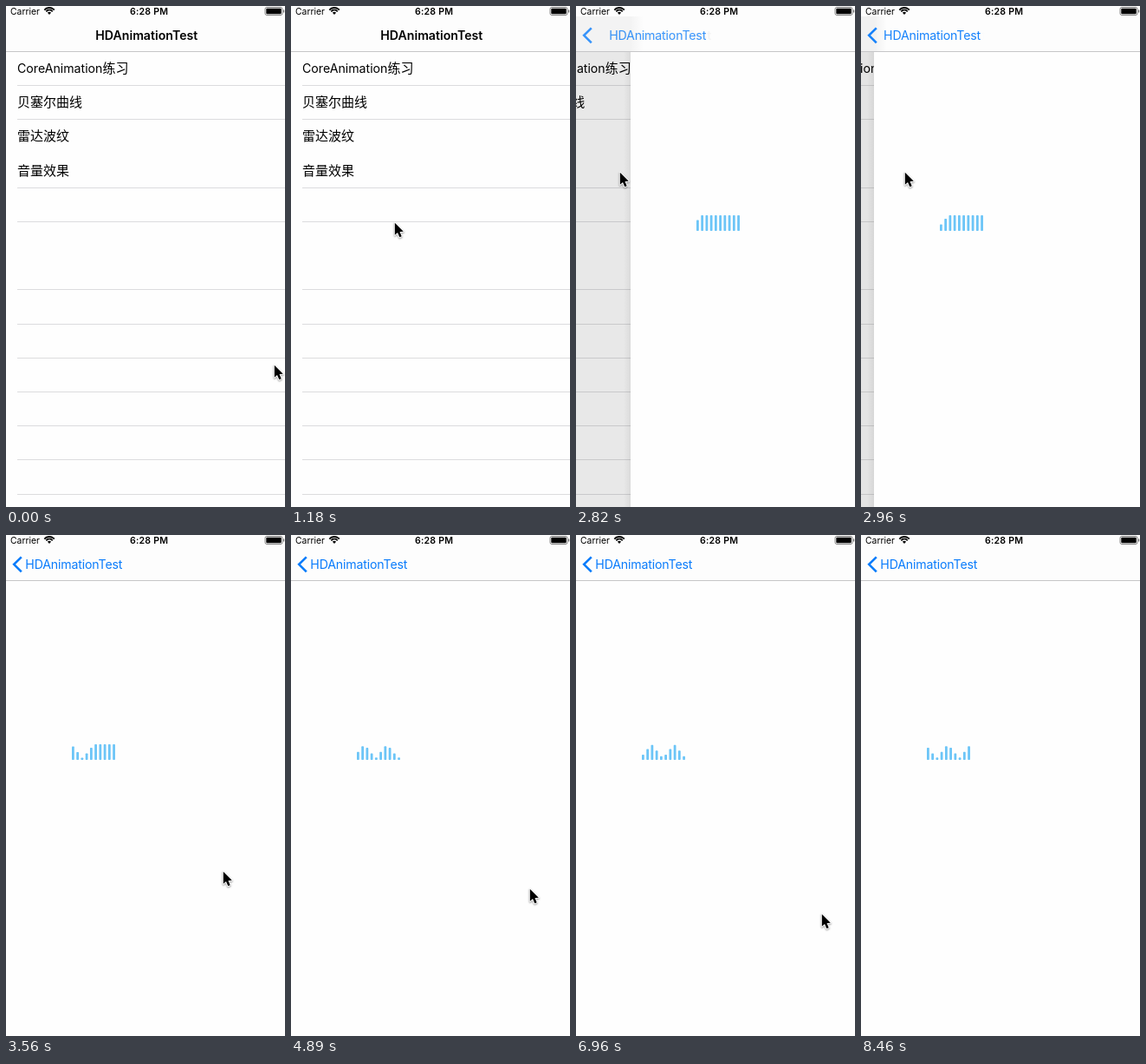
Animation, 322 px wide and 577 px high, one loop 8560 ms. Source, as an HTML page with a canvas:

```html
<!DOCTYPE html>
<html lang="zh-CN">
<head>
<meta charset="utf-8">
<title>HDAnimationTest</title>
<style>
  html, body { margin: 0; width: 100%; height: 100%; overflow: hidden; background: #fefefe; }
  canvas { display: block; }
</style>
</head>
<body>
<canvas id="stage" width="322" height="577"></canvas>
<script>
const ctx = document.getElementById('stage').getContext('2d');
const W = 322, H = 577, LOOP = 8560;
const NAV_BOTTOM = 52, ROW = 39.23;
const PAPER = '#fefefe', BLUE = '#0a7cfb', BAR_BLUE = '#6cc5f7';
const LATIN = 'Inter, sans-serif';
const HAN = '"Noto Sans CJK SC", "Noto Sans CJK", sans-serif';
const ROWS = [['CoreAnimation', '练习'], ['', '贝塞尔曲线'], ['', '雷达波纹'], ['', '音量效果']];
const MISSING_LINES = [2, 5];

// The screen was sampled every 150 ms and plays slightly faster.
const SAMPLE = 150, HOLD = 148;
const PUSH_START = 2680, BARS_START = 2677;

// Pointer waypoints: sample index, x, y
const POINTER = [
  [1, 309, 413], [5, 163, 379], [7, 163, 379], [8, 119, 249], [9, 119, 249],
  [15, 50, 191], [20, 50, 191], [24, 250, 387], [27, 275, 407], [41, 275, 407],
  [47, 283, 436], [49, 295, 490], [52, 306, 533], [54, 335, 533]
];
const ARROW = [[0, 0], [0, 14], [3.2, 11.2], [5.5, 16.5], [7.9, 15.4], [5.7, 10.3], [10, 10]];

function rect(x, y, w, h, color) {
  ctx.fillStyle = color;
  ctx.fillRect(x, y, w, h);
}

function text(string, x, y, font, color = '#000', spacing = 0) {
  ctx.font = font;
  ctx.letterSpacing = spacing + 'px';
  ctx.fillStyle = color;
  ctx.fillText(string, x, y);
  return ctx.measureText(string).width;
}

function polyline(points) {
  ctx.beginPath();
  points.forEach(([x, y]) => ctx.lineTo(x, y));
}

function fade(x0, x1, from, to) {
  const gradient = ctx.createLinearGradient(x0, 0, x1, 0);
  gradient.addColorStop(0, from);
  gradient.addColorStop(1, to);
  return gradient;
}

function withAlpha(alpha, draw) {
  ctx.save();
  ctx.globalAlpha = alpha;
  draw();
  ctx.restore();
}

function drawList(shift) {
  ctx.save();
  ctx.translate(-shift, 0);
  for (let i = 0; i < 13; i++) {
    if (!MISSING_LINES.includes(i)) rect(13, Math.floor(91.4 + i * ROW), W + shift, 1, '#dcdcde');
  }
  ROWS.forEach(([latin, han], i) => {
    const y = 77 + i * ROW;
    const width = text(latin, 13, y, '14.15px ' + LATIN);
    text(han, 13 + width, y, '15px ' + HAN);
  });
  ctx.restore();
}

function drawBars(left, time) {
  ctx.fillStyle = BAR_BLUE;
  for (let i = 0; i < 10; i++) {
    const elapsed = (time - BARS_START) / 1000 - i % 5 * 0.2 - (i > 4 ? 1 : 0);
    const phase = elapsed > 0 ? elapsed % 1 : 0;
    const scale = 1 - 0.9 * (1 - Math.abs(1 - 2 * phase));
    const height = 18 * scale;
    ctx.beginPath();
    ctx.roundRect(left + 76 + i * 5.24, 259 - height, 2.8, height, 0.8);
    ctx.fill();
  }
}

function drawStatus() {
  text('Carrier', 5, 10, '10.4px ' + LATIN);
  text('6:28 PM', 143, 10, '600 10.6px ' + LATIN, '#000', 0.2);

  ctx.strokeStyle = '#000';
  ctx.lineWidth = 1.8;
  [7.6, 4.9].forEach(radius => {
    ctx.beginPath();
    ctx.arc(50, 9.6, radius, -Math.PI * 0.77, -Math.PI * 0.23);
    ctx.stroke();
  });
  ctx.fillStyle = '#000';
  ctx.beginPath();
  ctx.moveTo(50, 10);
  ctx.arc(50, 9.6, 2.8, -Math.PI * 0.77, -Math.PI * 0.23);
  ctx.fill();

  ctx.strokeStyle = '#777';
  ctx.lineWidth = 0.9;
  ctx.beginPath();
  ctx.roundRect(299, 1.5, 20, 9, 2);
  ctx.stroke();
  ctx.fillStyle = '#000';
  ctx.beginPath();
  ctx.roundRect(300.3, 2.8, 17.4, 6.4, 1);
  ctx.fill();
  rect(320, 4.5, 1.2, 3, '#777');
}

function drawNav(p, edge) {
  rect(0, 0, W, NAV_BOTTOM, '#fdfdfd');
  if (p > 0 && edge > 1) {
    const tint = `rgba(0,0,0,${0.05 * p})`;
    rect(0, 12, edge, 40, tint);
    rect(edge, 12, 15, 40, fade(edge, edge + 15, tint, 'rgba(0,0,0,0)'));
  }
  rect(0, NAV_BOTTOM, W, 1, '#c6c6c8');

  const titleX = 103.3 - 81 * p;
  if (p < 1) {
    withAlpha((1 - p) ** 2, () => text('HDAnimationTest', titleX, 39, '600 14.15px ' + LATIN));
  }
  withAlpha(p, () => {
    text('HDAnimationTest', titleX, 39, '14.15px ' + LATIN, BLUE, -0.16);
    ctx.strokeStyle = BLUE;
    ctx.lineWidth = 2.6;
    polyline([[17.8, 25.3], [9.2, 33.8], [17.8, 42.3]]);
    ctx.stroke();
  });
}

function pointerAt(sample) {
  const next = POINTER.findIndex(([n]) => n >= sample);
  if (next < 0) return null;
  if (next === 0) return POINTER[0].slice(1);
  const [n0, x0, y0] = POINTER[next - 1], [n1, x1, y1] = POINTER[next];
  const k = (sample - n0) / (n1 - n0);
  return [x0 + (x1 - x0) * k, y0 + (y1 - y0) * k];
}

function drawPointer(sample) {
  const position = pointerAt(sample);
  if (!position) return;
  ctx.save();
  ctx.translate(position[0] + 0.8, position[1] + 0.8);
  polyline(ARROW);
  ctx.closePath();
  ctx.lineJoin = 'round';
  ctx.lineWidth = 2;
  ctx.strokeStyle = '#fff';
  ctx.shadowColor = 'rgba(0,0,0,0.4)';
  ctx.shadowBlur = 2;
  ctx.shadowOffsetY = 1;
  ctx.stroke();
  ctx.shadowColor = 'transparent';
  ctx.fillStyle = '#000';
  ctx.fill();
  ctx.restore();
}

function draw(now) {
  const sample = Math.floor((now % LOOP + 4) / HOLD);
  const time = sample * SAMPLE;
  const pushed = Math.max(0, time - PUSH_START);
  const p = pushed > 700 ? 1 : 1 - Math.exp(-pushed * 0.0096);
  const edge = Math.round(W * (1 - p));

  rect(0, 0, W, H, PAPER);
  if (p < 1) drawList(0.3 * W * p);
  if (p > 0) {
    rect(0, NAV_BOTTOM, edge, H, `rgba(0,0,0,${0.108 * p})`);
    if (edge > 0) rect(edge - 8, NAV_BOTTOM, 8, H, fade(edge - 8, edge, 'rgba(0,0,0,0)', 'rgba(0,0,0,0.06)'));
    rect(edge, NAV_BOTTOM, W, H, PAPER);
    drawBars(edge, time);
  }
  drawNav(p, edge);
  drawStatus();
  drawPointer(sample);
  requestAnimationFrame(tick);
}

let start;
function tick(now) {
  start ??= now;
  draw(now - start);
}
requestAnimationFrame(tick);
</script>
</body>
</html>
```
